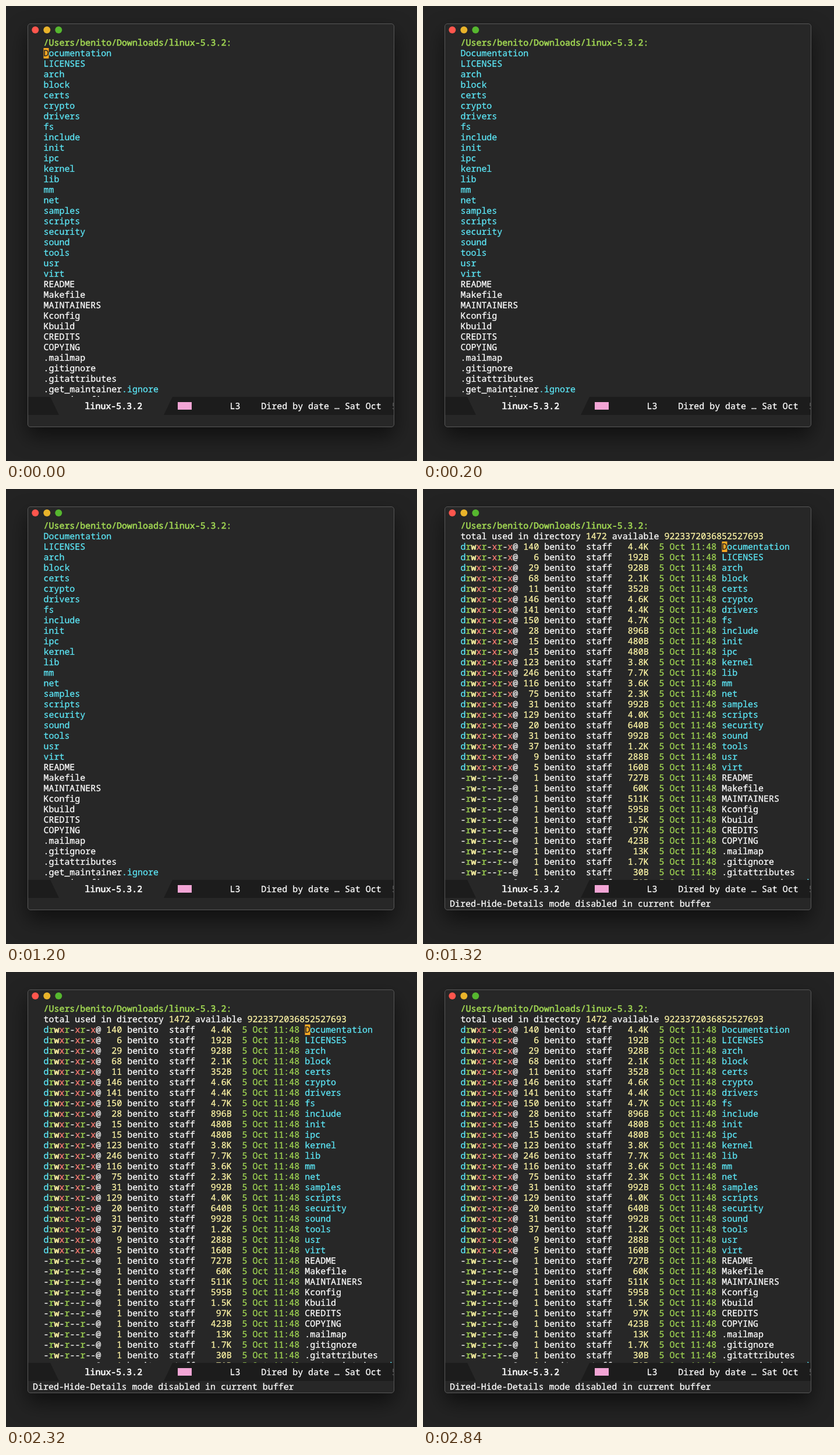
These frames come from a looping animation (706 by 780 pixels, 3.12 s). An HTML page:

```html
<!DOCTYPE html>
<html lang="en">
<head>
<meta charset="utf-8">
<title>Directory listing</title>
<style>
  html, body { margin: 0; width: 100%; height: 100%; overflow: hidden; background: #232323; }
  #stage { position: relative; width: 706px; height: 780px; overflow: hidden; background: #232323; }
  #window {
    position: absolute; left: 37px; top: 30px; width: 628px; height: 690px;
    border: 1px solid #595959; border-radius: 5px; background: #272727;
    box-shadow: 0 16px 34px rgba(0, 0, 0, .55);
  }
  svg { position: absolute; left: 0; top: 0; }
  text {
    font: 500 14.967px "Noto Sans Mono", "DejaVu Sans Mono", monospace;
    white-space: pre; text-rendering: geometricPrecision; color: #fff;
  }
  tspan { fill: currentColor; stroke: currentColor; stroke-width: .3px; }
  .bold { stroke-width: .65px; }
  .cyan { color: #5ce6f6; }
  .green { color: #9fd452; }
  .yellow { color: #fff6a6; }
  .red { color: #fb7b72; }
  .dark { color: #272727; }
  .dim { color: #555; }
</style>
</head>
<body>
<div id="stage">
  <div id="window"></div>
  <svg width="706" height="780" viewBox="0 0 706 780">
    <defs>
      <clipPath id="buffer"><rect x="38" y="31" width="628" height="639"/></clipPath>
      <clipPath id="bar"><rect x="38" y="670" width="628" height="31"/></clipPath>
    </defs>
    <circle cx="50.3" cy="41" r="6" fill="#ff564d"/>
    <circle cx="70.3" cy="41" r="6" fill="#e9b32a"/>
    <circle cx="90.3" cy="41" r="6" fill="#56b72f"/>
    <g clip-path="url(#buffer)">
      <g id="header"></g>
      <g id="brief"></g>
      <g id="details"></g>
      <g id="cursor"></g>
    </g>
    <g id="status" clip-path="url(#bar)">
      <path d="M38 670H76L91 701H38ZM286 670H666V701H271Z" fill="#1c1c1c"/>
      <rect x="295" y="679" width="24" height="13" fill="#f2a5d5"/>
    </g>
    <g id="echo"></g>
  </svg>
</div>
<script>
const LOOP = 3120, CELL = 8.98, LEFT = 64.5, ROW = 18, FIRST = 68.2;
const USER = 'benito';
const byId = id => document.getElementById(id);

function add(parent, tag, attrs, content = '') {
  const node = document.createElementNS('http://www.w3.org/2000/svg', tag);
  for (const key in attrs) node.setAttribute(key, attrs[key]);
  node.textContent = content;
  return parent.appendChild(node);
}

// Each run is [text, class].
function write(parent, x, y, ...runs) {
  const line = add(parent, 'text', { x, y });
  for (const [content, style = ''] of runs) add(line, 'tspan', { class: style }, content);
}
const writeRow = (parent, row, ...runs) => write(parent, LEFT, FIRST + row * ROW, ...runs);

const folders = `Documentation 140 4.4K|LICENSES 6 192B|arch 29 928B|block 68 2.1K|certs 11 352B
crypto 146 4.6K|drivers 141 4.4K|fs 150 4.7K|include 28 896B|init 15 480B|ipc 15 480B
kernel 123 3.8K|lib 246 7.7K|mm 116 3.6K|net 75 2.3K|samples 31 992B|scripts 129 4.0K
security 20 640B|sound 31 992B|tools 37 1.2K|usr 9 288B|virt 5 160B`;
const files = `README 1 727B|Makefile 1 60K|MAINTAINERS 1 511K|Kconfig 1 595B|Kbuild 1 1.5K
CREDITS 1 97K|COPYING 1 423B|.mailmap 1 13K|.gitignore 1 1.7K|.gitattributes 1 30B
.get_maintainer.ignore 1 71B|.cocciconfig 1 59B`;
const parse = (list, folder) => list.split(/[|\n]/).map(entry => {
  const [name, links, size] = entry.split(' ');
  return { name, links, size, folder };
});
const entries = [...parse(folders, true), ...parse(files, false)];

const permStyle = { d: 'cyan', r: 'green', w: 'yellow bold', x: 'red' };
const permRuns = folder =>
  [...(folder ? 'drwxr-xr-x@' : '-rw-r--r--@')].map(c => [c, permStyle[c]]);

function nameRuns({ name, folder }) {
  if (folder) return [[name, 'cyan']];
  const [stem, tail] = name.split(/(?=\.ignore$)/);
  return tail ? [[stem], [tail, 'cyan']] : [[name]];
}

writeRow(byId('header'), 0, [`/Users/${USER}/Downloads/linux-5.3.2:`, 'green bold']);
writeRow(byId('details'), 1, ['total used in directory '], ['1472', 'yellow'],
  [' available '], ['9223372036852527693', 'yellow']);

entries.forEach((entry, i) => {
  writeRow(byId('brief'), i + 1, ...nameRuns(entry));
  writeRow(byId('details'), i + 2,
    ...permRuns(entry.folder),
    [entry.links.padStart(4), 'yellow'],
    [` ${USER}  staff`],
    [entry.size.padStart(7), 'yellow'],
    ['  5 Oct 11:48 ', 'green'],
    ...nameRuns(entry));
});

add(byId('cursor'), 'rect', { x: LEFT, y: 72, width: 9, height: ROW, fill: '#fba922' });
writeRow(byId('cursor'), 1, ['D', 'dark']);

write(byId('status'), 135.5, 691.2, ['linux-5.3.2', 'bold']);
write(byId('status'), 384.5, 691.2, ['L3    Dired by date … Sat Oct  '], ['5', 'dim']);
write(byId('echo'), 46, 716.2, ['Dired-Hide-Details mode disabled in current buffer']);

// Holds each value from its time until the next one.
function hold(id, property, steps) {
  const frames = steps.map(([time, value]) =>
    ({ offset: time / LOOP, [property]: value, easing: 'steps(1, end)' }));
  frames.push({ offset: 1, [property]: steps.at(-1)[1] });
  byId(id).animate(frames, { duration: LOOP, iterations: Infinity }).startTime = 0;
}

const EXPAND = 1320;
hold('brief', 'opacity', [[0, 1], [EXPAND, 0]]);
hold('details', 'opacity', [[0, 0], [EXPAND, 1]]);
hold('echo', 'opacity', [[0, 0], [EXPAND, 1]]);
hold('cursor', 'opacity',
  [[0, 1], [200, 0], [680, 1], [1200, 0], [EXPAND, 1], [1840, 0], [2320, 1], [2840, 0]]);
hold('cursor', 'transform',
  [[0, 'translate(0px, 0px)'], [EXPAND, `translate(${50 * CELL}px, ${ROW}px)`]]);
</script>
</body>
</html>
```
